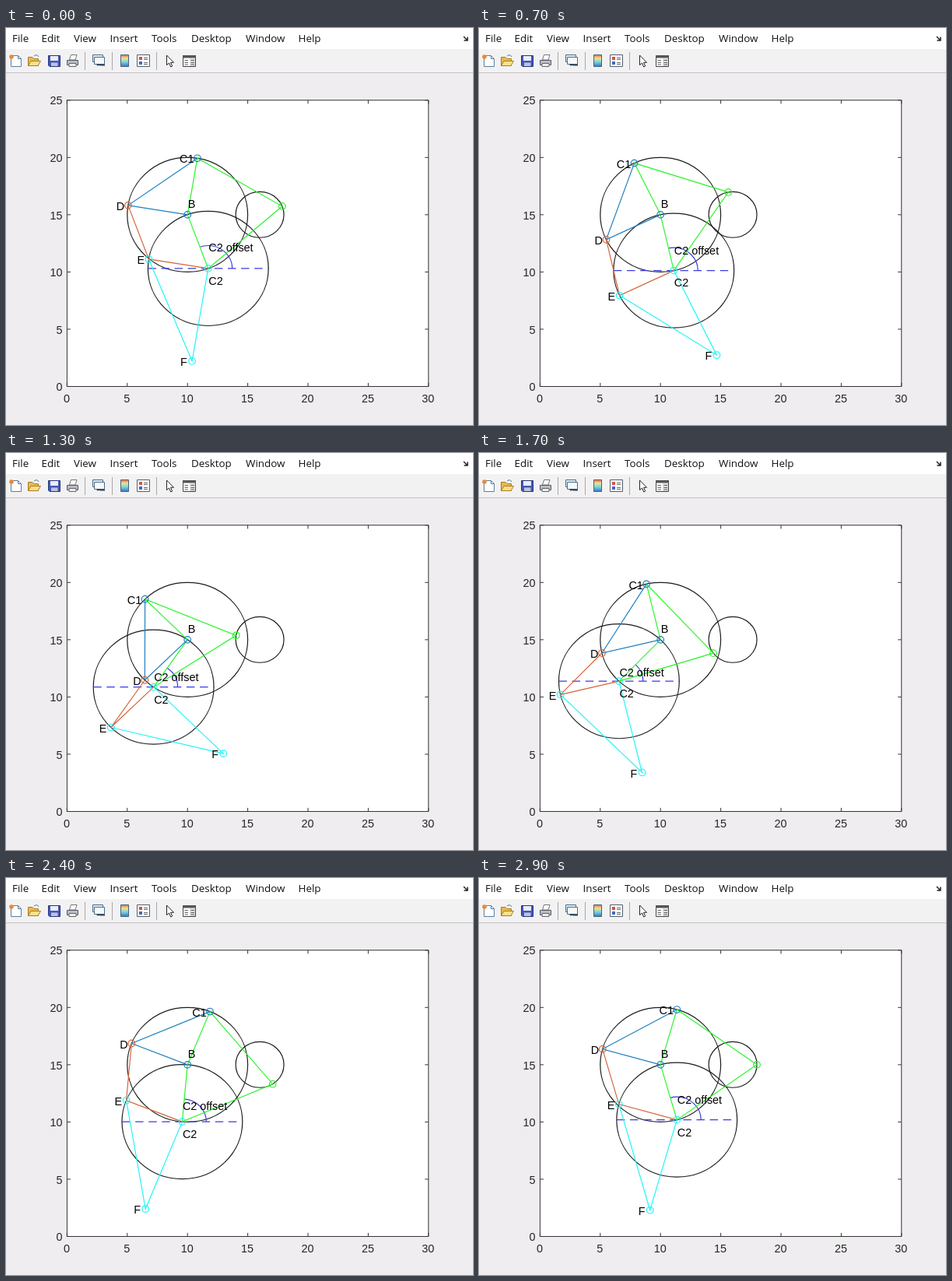
Write an HTML page with a canvas that moves like this. It is 600 by 510 pixels and loops after 3000 ms.

```html
<!DOCTYPE html>
<html lang="en">
<head>
<meta charset="utf-8">
<title>Leg linkage</title>
<style>
  html, body { margin: 0; width: 100%; height: 100%; overflow: hidden; background: #efedef; }
  svg, canvas { position: absolute; left: 0; top: 0; width: 600px; height: 510px; }
  .menu { font: 13.4px "Open Sans", "Noto Sans", sans-serif; fill: #111; }
</style>
</head>
<body>
<svg viewBox="0 0 600 510">
  <rect width="600" height="510" fill="#efedef"/>
  <rect width="600" height="27" fill="#fff"/>
  <rect y="27" width="600" height="30" fill="#f3f2f3"/>
  <path d="M0 57.5H600" stroke="#c4c2c4"/>
  <g class="menu">
    <text x="8" y="18">File</text>
    <text x="45.5" y="18">Edit</text>
    <text x="87" y="18">View</text>
    <text x="133.5" y="18">Insert</text>
    <text x="187" y="18">Tools</text>
    <text x="238" y="18">Desktop</text>
    <text x="308" y="18">Window</text>
    <text x="375.5" y="18">Help</text>
  </g>
  <path d="M588 11l4 4M593 11.500V16H588.500" fill="none" stroke="#222" stroke-width="1.500"/>
  <path d="M101.500 31V54M136.500 31V54M193.500 31V54" stroke="#a9a7a9"/>

  <!-- new, open, save, print -->
  <path d="M6.500 35.500H15.500L19.500 39.500V49.500H6.500ZM15.500 35.500V39.500H19.500" fill="#fff" stroke="#5b7f9f"/>
  <circle cx="7" cy="37" r="2.800" fill="#e58a3a"/>
  <path d="M28.500 48.500V37.500H34L36 39.500H41.500V48.500Z" fill="#e9b94c" stroke="#a97d25"/>
  <path d="M28.500 48.500L32 42.500H44.500L41 48.500Z" fill="#ffe08a" stroke="#a97d25"/>
  <path d="M36 36q4-3 6 1" fill="none" stroke="#4a73a8"/>
  <path d="M54.500 35.500H69.500V49.500H56L54.500 48Z" fill="#4557b5" stroke="#27357f"/>
  <path d="M57 36H67V42H57Z" fill="#e8edf8"/>
  <path d="M58 44.500H66.500V49H58Z" fill="#bcc3dd"/>
  <path d="M81.500 41L83.500 34.500H91L89 41Z" fill="#fff" stroke="#777"/>
  <path d="M78.500 41.500H92.500V47.500H78.500Z" fill="#b9bdc6" stroke="#555b66"/>
  <path d="M81 45.500H90V49.500H81Z" fill="#eee" stroke="#666"/>

  <!-- link, colour bar, legend -->
  <path d="M111.500 34.500H124.500V43.500H111.500Z" fill="#dcebf5" stroke="#4b6b88"/>
  <path d="M113.500 37.500H126.500V46.500H113.500Z" fill="#f5f9fc" stroke="#4b6b88"/>
  <path d="M117 48a3 2 0 0 1 5 0M122 47.500H127" fill="none" stroke="#345" stroke-width="2"/>
  <linearGradient id="bar" x2="0" y2="1">
    <stop stop-color="#e56a52"/><stop offset=".3" stop-color="#efe38a"/>
    <stop offset=".6" stop-color="#78d5dd"/><stop offset="1" stop-color="#3e72c4"/>
  </linearGradient>
  <path d="M147.500 34.500H157.500V49.500H147.500Z" fill="url(#bar)" stroke="#47617d"/>
  <path d="M168.500 34.500H184.500V49.500H168.500Z" fill="#fff" stroke="#555f70"/>
  <path d="M171 37H175V41H171Z" fill="#d9533c"/>
  <path d="M171 43H175V47H171Z" fill="#4568b8"/>
  <path d="M177 38.500H182M177 40.500H182M177 44.500H182M177 46.500H182" stroke="#666"/>

  <!-- pointer, property panel -->
  <path d="M206.500 35V47.500L209.500 45L211.700 50L213.700 49L211.500 44.300H215.500Z" fill="#fff" stroke="#222"/>
  <path d="M227.500 35.500H243.500V49.500H227.500Z" fill="#fff" stroke="#444"/>
  <path d="M227 35H244V38.500H227Z" fill="#555"/>
  <path d="M236 39H243V49H236Z" fill="#dcdcdc"/>
  <path d="M229.500 41.500H234M229.500 44.500H234M229.500 47H234M237.500 41.500H242M237.500 44.500H242M237.500 47H242" stroke="#666"/>
</svg>
<canvas id="plot" width="600" height="510"></canvas>
<script>
const ctx = document.getElementById('plot').getContext('2d');
const LEFT = 78.4, BASE = 460.5, SX = 15.48, SY = 14.71;
const BLUE = '#1f7fc0', ORANGE = '#d4663c', GREEN = '#2bf52b', CYAN = '#22f4f6', INK = '#1c1c1c';
const B = [10, 15], HUB = [16, 15], CRANK = 2, ARM = 5, ROD = 8.2;
const STEP_MS = 100, STEPS = 30, TAU = Math.PI * 2;

// Crank position in hundredths of a turn, by step of the loop
const keys = [[0, 6], [7, 28], [10, 38], [17, 60], [21, 74], [24, 84], [29, 100]];

const px = p => [LEFT + p[0] * SX, BASE - p[1] * SY];
const add = (p, q, k = 1) => [p[0] + q[0] * k, p[1] + q[1] * k];

function crankAngle(step) {
  let i = 1;
  while (keys[i][0] < step) i++;
  const [t0, a0] = keys[i - 1], [t1, a1] = keys[i];
  return Math.round(a0 + (a1 - a0) * (step - t0) / (t1 - t0)) * TAU / 100;
}

// Where a circle of radius r about p meets one of radius s about q
function meet(p, r, q, s, side) {
  const v = add(q, p, -1), d = Math.hypot(...v);
  const a = (d * d + r * r - s * s) / (2 * d), h = side * Math.sqrt(r * r - a * a);
  return [p[0] + (a * v[0] - h * v[1]) / d, p[1] + (a * v[1] + h * v[0]) / d];
}

function stroke(color, dash = []) {
  ctx.strokeStyle = color;
  ctx.setLineDash(dash);
  ctx.stroke();
}

function line(color, points, dash) {
  ctx.beginPath();
  points.forEach(p => ctx.lineTo(...px(p)));
  stroke(color, dash);
}

function arc(color, c, r, end = TAU) {
  ctx.beginPath();
  ctx.ellipse(...px(c), r * SX, r * SY, 0, 0, -end, true);
  stroke(color);
}

function mark(color, ...points) {
  for (const p of points) {
    ctx.beginPath();
    ctx.arc(...px(p), 4.3, 0, TAU);
    stroke(color);
  }
}

// Text starting at a point shifted by plot units
function label(text, p, dx, dy) {
  const [x, y] = px(add(p, [dx, dy]));
  ctx.fillText(text, x + 0.5, y + 6.2);
}

function drawAxes() {
  const [left, base] = px([0, 0]), [right, top] = px([30, 25]);
  ctx.lineWidth = 1;
  ctx.fillStyle = '#fff';
  ctx.fillRect(left, top, right - left, base - top);
  ctx.fillStyle = '#262626';
  ctx.beginPath();
  ctx.rect(left, top, right - left, base - top);
  for (let v = 0; v <= 30; v += 5) {
    const [x, y] = px([v, v]);
    ctx.textAlign = 'center';
    ctx.fillText(v, x - 0.5, 481);
    ctx.moveTo(x, base); ctx.lineTo(x, base - 4.6);
    ctx.moveTo(x, top); ctx.lineTo(x, top + 4.6);
    if (v > 25) continue;
    ctx.textAlign = 'right';
    ctx.fillText(v, 72.5, y + 5.7);
    ctx.moveTo(left, y); ctx.lineTo(left + 4.6, y);
    ctx.moveTo(right, y); ctx.lineTo(right - 4.6, y);
  }
  ctx.textAlign = 'left';
  stroke('#333');
}

function drawLinkage(angle) {
  const A = [HUB[0] + CRANK * Math.cos(angle), HUB[1] + CRANK * Math.sin(angle)];
  const C1 = meet(B, ARM, A, ROD, 1), C2 = meet(B, ARM, A, ROD, -1);
  const up = add(C1, B, -1);
  const D = add(B, [-up[1], up[0]]);
  const E = add(D, add(C2, B, -1));
  const F = add(C2, up, -ROD / ARM);
  const offset = Math.atan2(B[1] - C2[1], B[0] - C2[0]);

  ctx.lineWidth = 1.2;
  arc(INK, B, ARM);
  arc(INK, HUB, CRANK);
  arc(INK, C2, ARM);
  line('#3a3ae0', [add(C2, [-ARM, 0]), add(C2, [ARM, 0])], [10.5, 6.6]);
  arc('#3a3ae0', C2, 2, offset);

  line(GREEN, [B, C1, A, C2, B]);
  mark(GREEN, A);
  line(BLUE, [C1, D, B]);
  mark(BLUE, C1, B);
  line(ORANGE, [D, E, C2]);
  mark(ORANGE, D);
  line(CYAN, [E, F, C2]);
  mark(CYAN, E, F, C2);

  ctx.fillStyle = '#000';
  label('B', B, 0, 1);
  label('C1', C1, -1.5, 0);
  label('C2', C2, 0, -1);
  label('C2 offset', C2, 0, offset); // rises with the angle in radians
  label('D', D, -1, 0);
  label('E', E, -1, 0);
  label('F', F, -1, 0);
}

function frame(now) {
  ctx.clearRect(0, 0, 600, 510);
  ctx.font = '14.4px "Liberation Sans", Arial, sans-serif';
  drawAxes();
  drawLinkage(crankAngle(Math.floor(now / STEP_MS) % STEPS));
  requestAnimationFrame(frame);
}

frame(performance.now());
</script>
</body>
</html>
```
